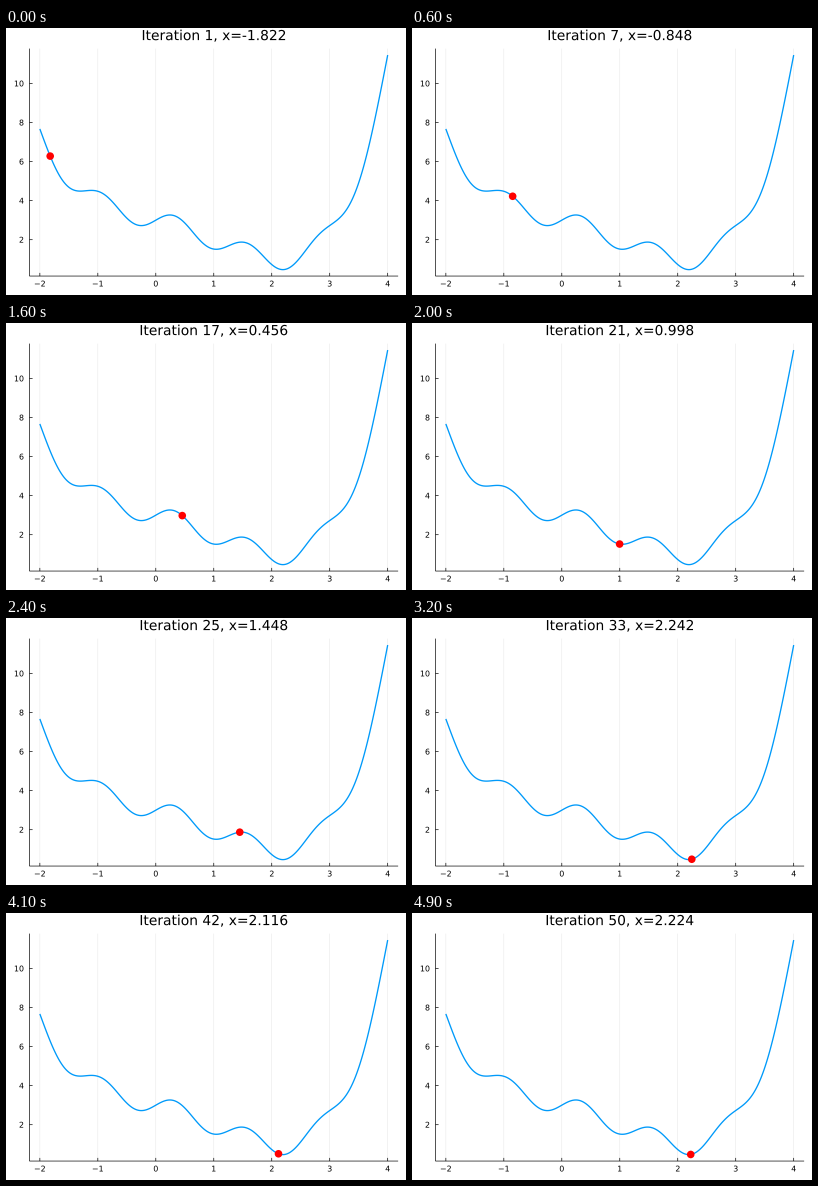
Write a matplotlib script that moves like this. It is 400 px wide and 267 px high and loops after 5000 ms.

```python
import numpy as np
import matplotlib.pyplot as plt
from matplotlib.animation import FuncAnimation
from matplotlib.patches import Circle, PathPatch
from matplotlib.path import Path
from matplotlib.textpath import TextPath

WIDTH, HEIGHT, DPI = 400, 267, 100
FRAMES, INTERVAL = 50, 100
LEFT, RIGHT, TOP, BOTTOM = 23.42, 392.13, 20.6, 248.05
RATE, MOMENTUM, START = 0.01, 0.9, -1.9
PX = 72 / DPI  # points per pixel
TICK_SIZE, TITLE_SIZE = 7.9, 13.83
DIGIT = 0.636  # advance of one digit in em
TICK_LENGTH = 3.15
X_TICKS, Y_TICKS = range(-2, 5), range(2, 11, 2)

plt.rcParams.update({"font.family": "DejaVu Sans",
                     "path.snap": False, "path.simplify": False})


def loss(x):
    return 0.1 * x**4 - 0.2 * x**3 - 0.1 * x**2 - 0.8 * x + 3 + 0.5 * np.sin(5 * x)


def slope(x):
    return 0.4 * x**3 - 0.6 * x**2 - 0.2 * x - 0.8 + 2.5 * np.cos(5 * x)


def descend(x, steps):
    """Positions visited by gradient descent with momentum."""
    path, velocity = [], 0.0
    for _ in range(steps):
        velocity = MOMENTUM * velocity - RATE * slope(x)
        x += velocity
        path.append(x)
    return path


def widened(values, share=0.03):
    low, high = min(values), max(values)
    pad = share * (high - low)
    return low - pad, high + pad


path = descend(START, FRAMES)
xs = np.linspace(-2, 4, 601)
ys = loss(xs)
x_low, x_high = widened(xs)
y_low, y_high = widened(ys)


def px(x):
    return LEFT + (x - x_low) / (x_high - x_low) * (RIGHT - LEFT)


def py(y):
    return BOTTOM - (y - y_low) / (y_high - y_low) * (BOTTOM - TOP)


# One pixel per unit, y counted downwards.
fig = plt.figure(figsize=(WIDTH / DPI, HEIGHT / DPI), dpi=DPI, facecolor="white")
ax = fig.add_axes([0, 0, 1, 1])
ax.set_xlim(0, WIDTH)
ax.set_ylim(HEIGHT, 0)
ax.axis("off")


def line(x, y, width, color="black", **style):
    ax.plot(x, y, color=color, linewidth=width * PX,
            solid_capstyle="butt", **style)


def glyphs(x, baseline, text, size, centred=True):
    """Outline of a text, centred on x or ending there (digits only)."""
    outline = TextPath((0, 0), text, size=size)
    if centred:
        box = outline.get_extents()
        start = x - (box.x0 + box.x1) / 2
    else:
        start = x - DIGIT * size * len(text)
    return Path(outline.vertices * [1, -1] + [start, baseline], outline.codes)


def add_text(*args, **kwargs):
    return ax.add_patch(PathPatch(glyphs(*args, **kwargs), facecolor="black",
                                  linewidth=0))


for tick in X_TICKS:
    x = px(tick)
    line([x, x], [TOP, BOTTOM], 0.5, alpha=0.1)
    line([x, x], [BOTTOM, BOTTOM - TICK_LENGTH], 0.67)
    add_text(x, 258.46, str(tick).replace("-", "\u2212"), TICK_SIZE)
for tick in Y_TICKS:
    y = py(tick)
    line([LEFT, LEFT + TICK_LENGTH], [y, y], 0.67)
    add_text(18, y + 2.9, str(tick), TICK_SIZE, centred=False)
line([LEFT, RIGHT], [BOTTOM, BOTTOM], 0.67)
line([LEFT, LEFT], [TOP, BOTTOM], 0.67)
line(px(xs), py(ys), 1.33, "#009afa")

ball = ax.add_patch(Circle((0, 0), 3.8, facecolor="red", linewidth=0, zorder=5))
title = add_text(0, 0, "Iteration", TITLE_SIZE)


def update(frame):
    x = path[frame]
    ball.center = px(x), py(loss(x))
    title.set_path(glyphs((LEFT + RIGHT) / 2 + 0.2, 12.11,
                          f"Iteration {frame + 1}, x={x:.3f}", TITLE_SIZE))
    return ball, title


animation = FuncAnimation(fig, update, frames=FRAMES, interval=INTERVAL,
                          repeat=True, repeat_delay=0)
plt.show()
```
